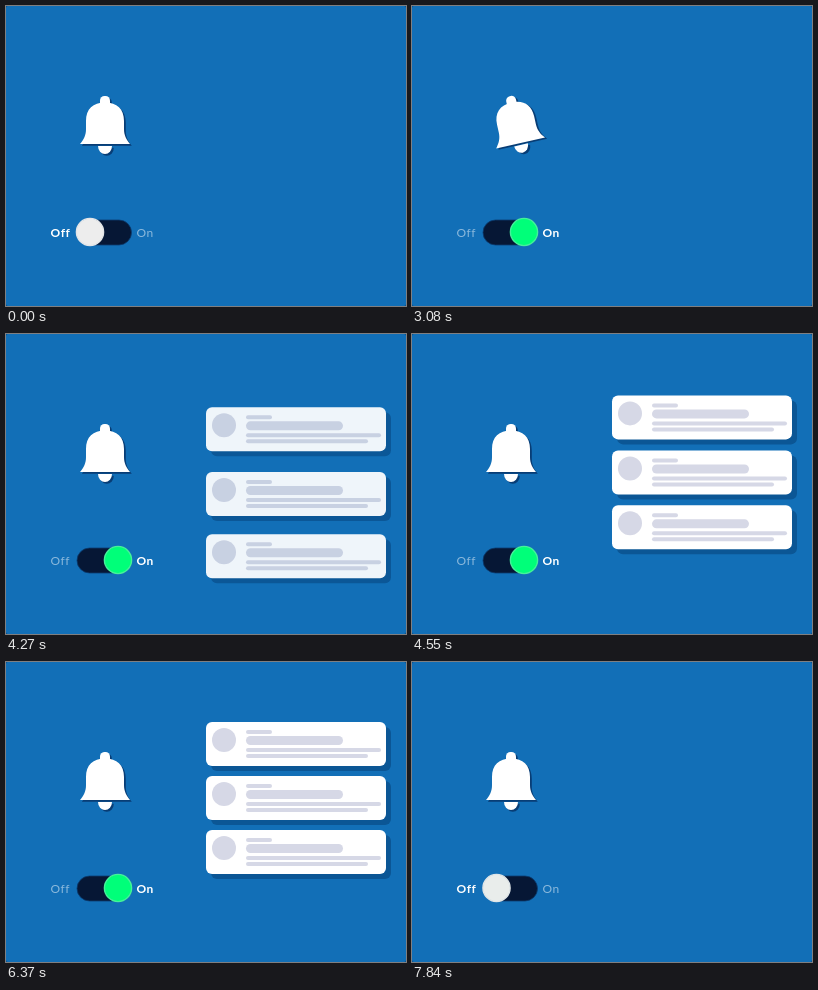
These frames come from a looping animation (400x300 px, 7.91 s). An HTML page:

```html
<!DOCTYPE html>
<html lang="en">
<head>
<meta charset="utf-8">
<title>Notification toggle</title>
<style>
  html, body { margin: 0; width: 100%; height: 100%; overflow: hidden; background: #0b4677; }
  svg { display: block; width: 100%; height: 100%; }
  text { font: 400 12px Lato, sans-serif; letter-spacing: .5px; fill: #fff; }
  .bold { font-weight: 700; }
</style>
</head>
<body>
<svg viewBox="0 0 400 300">
  <defs>
    <g id="bellShape">
      <rect x="94" y="90" width="10" height="14" rx="4.5"/>
      <path d="M74 138C78 133 80 129 80 123V115C80 103 87 96.5 99 96.5S118 103 118 115V123C118 129 120 133 124 138Z"/>
      <path d="M92 140H106A7 8 0 0 1 92 140Z"/>
    </g>
    <g id="card">
      <rect x="205" y="5" width="180" height="44" rx="6" fill="#0b5695"/>
      <rect x="200" width="180" height="44" rx="6" fill="#fff"/>
      <g fill="#d6d8e6">
        <circle cx="218" cy="18" r="12"/>
        <rect x="240" y="8" width="26" height="4" rx="2"/>
        <rect x="240" y="14" width="97" height="9" rx="4.5"/>
        <rect x="240" y="26" width="135" height="4" rx="2"/>
        <rect x="240" y="32" width="122" height="4" rx="2"/>
      </g>
    </g>
  </defs>

  <rect width="400" height="300" rx="2" fill="#126fb7"/>

  <g id="bell">
    <use href="#bellShape" x="1.8" y="1.8" fill="#083d75"/>
    <use href="#bellShape" fill="#fff"/>
  </g>

  <rect x="71" y="214" width="54.5" height="25" rx="12.5" fill="#061735" stroke="#0b3c70" stroke-width=".8"/>
  <circle id="knob" cy="226" r="13.6" stroke-width="1.4"/>
  <text class="bold" id="offBold" x="44.5" y="231">Off</text>
  <text id="offLight" x="44.5" y="231">Off</text>
  <text class="bold" id="onBold" x="130.5" y="231">On</text>
  <text id="onLight" x="130.5" y="231">On</text>

  <g id="cards">
    <use href="#card"/>
    <use href="#card"/>
    <use href="#card"/>
  </g>
</svg>
<script>
const LOOP = 7910, STEP = 70;
const TURN_ON = 1350, RING = 2730, RING_END = 3600, CARDS_IN = 3800, TURN_OFF = 7230;
const EASE_TIME = 1850, FADE_DELAY = 50, FADE_TIME = 450;
const CARD_TRAVEL = [250, 450, 605];
const LIGHT_OPACITY = 0.5;

const byId = id => document.getElementById(id);
const clamp = v => Math.max(0, Math.min(1, v));
const mix = (a, b, p) => a + (b - a) * p;
const mixColor = (a, b, p) => `rgb(${a.map((v, i) => Math.round(mix(v, b[i], p)))})`;
const easeOut = elapsed => 1 - (1 - clamp(elapsed / EASE_TIME)) ** 10;

const cards = [...byId('cards').children];

function drawToggle(t) {
  const on = t < TURN_OFF ? easeOut(t - TURN_ON) : 1 - easeOut(t - TURN_OFF);
  const knob = byId('knob');
  knob.setAttribute('cx', mix(84, 112, on));
  knob.setAttribute('fill', mixColor([237, 237, 237], [0, 255, 121], on));
  knob.setAttribute('stroke', mixColor([226, 229, 232], [70, 240, 155], on));
  byId('offBold').style.opacity = 1 - on;
  byId('offLight').style.opacity = LIGHT_OPACITY * on;
  byId('onBold').style.opacity = on;
  byId('onLight').style.opacity = LIGHT_OPACITY * (1 - on);
}

function drawBell(t) {
  const p = clamp((t - RING) / (RING_END - RING));
  const angle = 16 * Math.sin(p * Math.PI * 4) * (1 - p * p);
  byId('bell').setAttribute('transform', `rotate(${angle} 99 94)`);
}

function drawCards(t) {
  const leaving = t >= TURN_OFF;
  const elapsed = t - (leaving ? TURN_OFF : CARDS_IN);
  const fade = clamp((elapsed - FADE_DELAY) / FADE_TIME);
  const distance = leaving ? easeOut(elapsed) : 1 - easeOut(elapsed);
  cards.forEach((card, i) => {
    card.setAttribute('y', 60 + 54 * i + CARD_TRAVEL[i] * distance);
    card.style.opacity = leaving ? 1 - fade : fade;
  });
}

const start = performance.now();

function draw() {
  const elapsed = (performance.now() - start) % LOOP;
  const t = Math.floor(elapsed / STEP) * STEP;
  drawToggle(t);
  drawBell(t);
  drawCards(t);
  requestAnimationFrame(draw);
}
draw();
</script>
</body>
</html>
```
